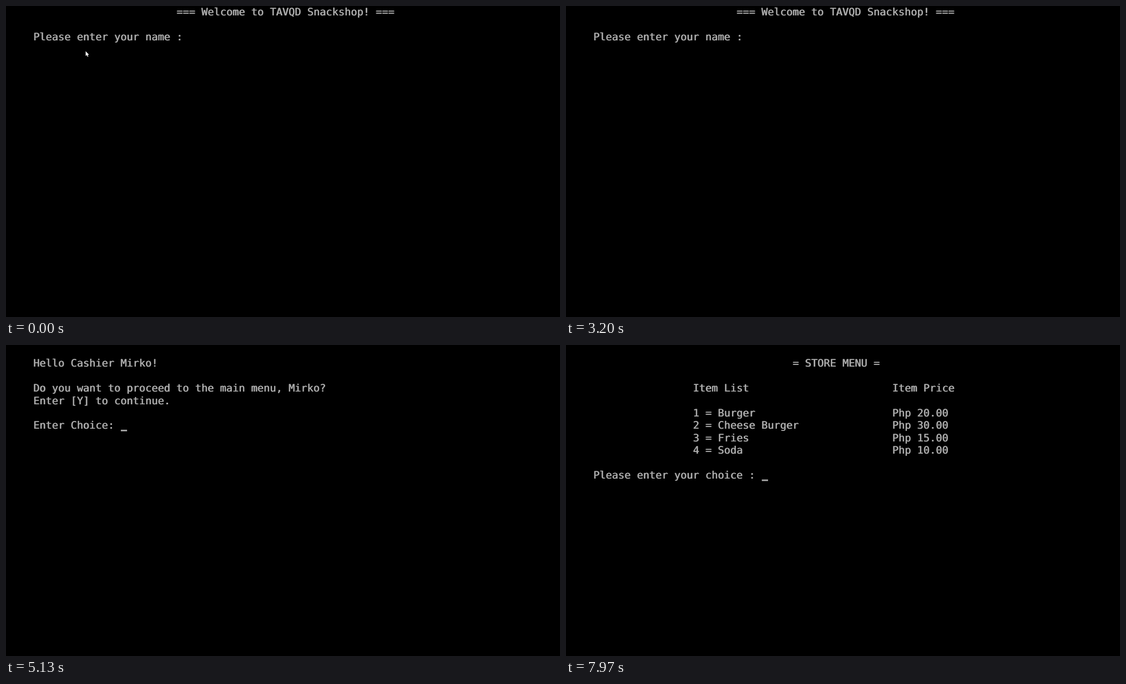
Write an HTML page that moves like this. It is 998 px wide and 561 px high and loops after 8 s.

```html
<!DOCTYPE html>
<html lang="en">
<head>
<meta charset="utf-8">
<title>Food store terminal</title>
<style>
html, body { margin: 0; width: 100%; height: 100%; overflow: hidden; background: #000; }
svg { display: block; width: 100%; height: 100%; }
text {
  font: 18.636px "DejaVu Sans Mono", monospace;
  fill: #aaa;
  white-space: pre;
  text-rendering: geometricPrecision;
}
</style>
</head>
<body>
<svg viewBox="0 0 998 561">
  <rect width="998" height="561" fill="#000"/>
  <g id="screen"></g>
  <use href="#screen" x="0.8"/>
  <rect id="caret" width="11.22" height="2.8" fill="#aaa"/>
  <path id="mouse" d="M0 0V8.6L2 6.9L3.5 10L4.9 9.4L3.5 6.4H6.1Z" fill="#fff"/>
</svg>
<script>
const LOOP = 8000, BLINK = 1000 * 8 / 70, BLINK_START = 3182;
const LEFT = 49.8, CELL_W = 11.22, CELL_H = 22.44;
const $ = id => document.getElementById(id);
const screen = $('screen'), caret = $('caret'), mouse = $('mouse');

// Each line is [row, column, text]; keys are [time, typed so far].
const name = 'Mirko';
const pages = [
  {
    start: 0, row: 2, col: 25,
    lines: [
      [0, 23, '=== Welcome to TAVQD Snackshop! ==='],
      [2, 0, 'Please enter your name :']
    ],
    keys: [3600, 3830, 4000, 4140, 4290].map((at, i) => [at, name.slice(0, i + 1)])
  },
  {
    start: 4800, row: 6, col: 14,
    lines: [
      [1, 0, `Hello Cashier ${name}!`],
      [3, 0, `Do you want to proceed to the main menu, ${name}?`],
      [4, 0, 'Enter [Y] to continue.'],
      [6, 0, 'Enter Choice:']
    ],
    keys: [[5700, 'U'], [6500, ''], [6730, 'Y']]
  },
  {
    start: 7100, row: 10, col: 27,
    lines: [
      [1, 32, '= STORE MENU ='],
      [3, 16, 'Item List'], [3, 48, 'Item Price'],
      [5, 16, '1 = Burger'], [5, 48, 'Php 20.00'],
      [6, 16, '2 = Cheese Burger'], [6, 48, 'Php 30.00'],
      [7, 16, '3 = Fries'], [7, 48, 'Php 15.00'],
      [8, 16, '4 = Soda'], [8, 48, 'Php 10.00'],
      [10, 0, 'Please enter your choice :']
    ],
    keys: []
  }
];

const cellX = col => LEFT + col * CELL_W;
const show = (el, on) => el.setAttribute('visibility', on ? 'visible' : 'hidden');

function add(parent, tag, attrs = {}) {
  const el = document.createElementNS('http://www.w3.org/2000/svg', tag);
  for (const key in attrs) el.setAttribute(key, attrs[key]);
  return parent.appendChild(el);
}

function addLine(parent, row, col, str) {
  const el = add(parent, 'text', { x: cellX(col) - 0.9, y: row * CELL_H + 16.8 });
  el.textContent = str;
  return el;
}

for (const page of pages) {
  page.group = add(screen, 'g');
  for (const line of page.lines) addLine(page.group, ...line);
  page.input = addLine(page.group, page.row, page.col, '');
}

function draw(t) {
  const page = pages.filter(p => t >= p.start).pop();
  for (const p of pages) p.group.setAttribute('display', p === page ? 'inline' : 'none');

  const key = page.keys.filter(k => t >= k[0]).pop();
  const typed = key ? key[1] : '';
  if (page.input.textContent !== typed) page.input.textContent = typed;

  caret.setAttribute('x', cellX(page.col + typed.length));
  caret.setAttribute('y', page.row * CELL_H + 18.2);
  show(caret, Math.floor((t - BLINK_START) / BLINK) % 2 !== 0);

  const p = Math.min(1, Math.max(0, (t - 30) / 870));
  const ease = p * p * (3 - 2 * p);
  mouse.setAttribute('transform', `translate(${143.5 + 269.5 * ease} ${81.5 + 3 * ease})`);
  show(mouse, t < 1330);
}

function frame() {
  draw(performance.now() % LOOP);
  requestAnimationFrame(frame);
}
frame();
</script>
</body>
</html>
```
